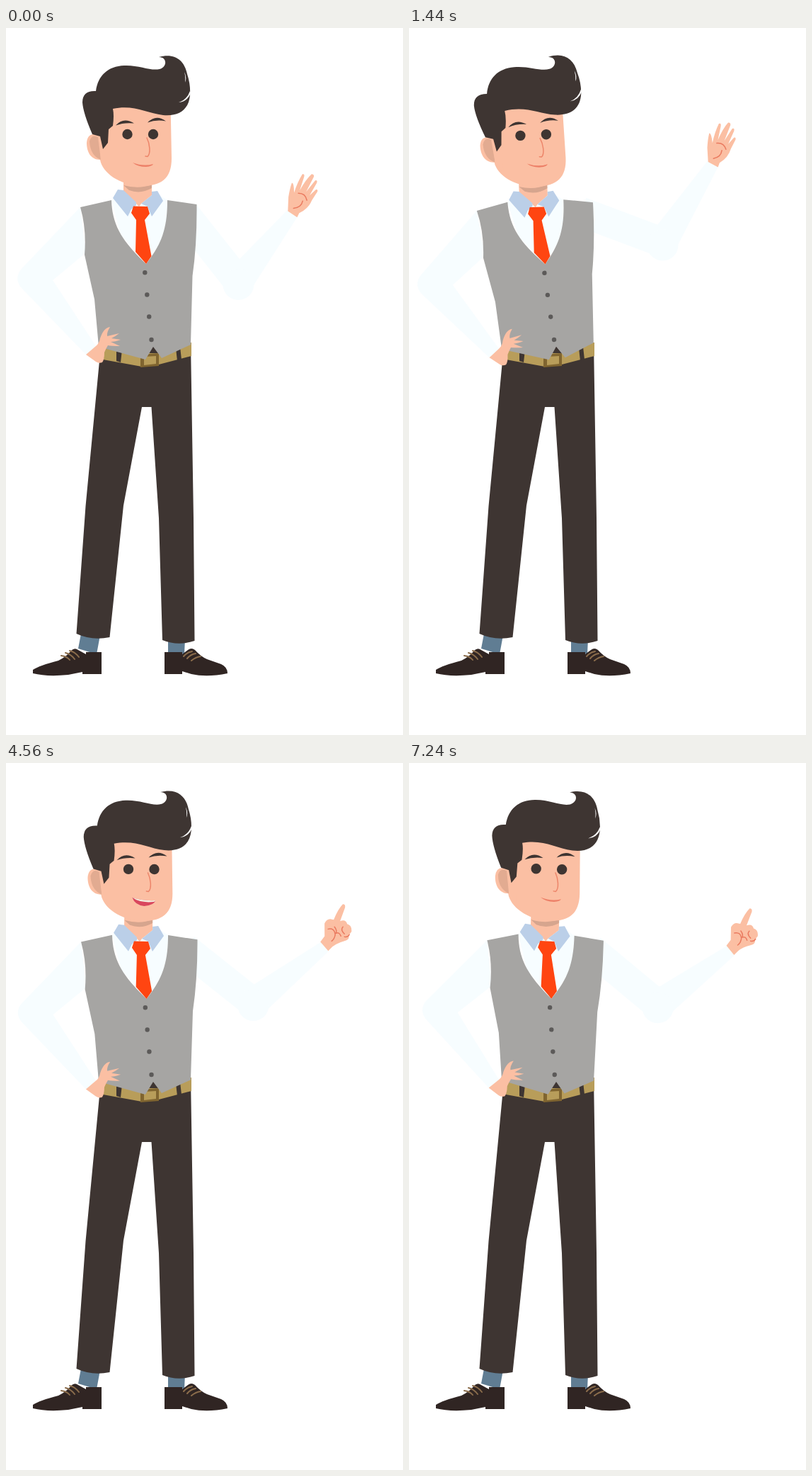
Write an HTML page that moves like this. It is 561x998 px and loops after 7.72 s.

```html
<!DOCTYPE html>
<html lang="en">
<head>
<meta charset="utf-8">
<title>Presenter</title>
<style>
html, body { margin: 0; width: 100%; height: 100%; overflow: hidden; background: #fff; }
svg { display: block; width: 100%; height: 100%; }
.dark { fill: #3e3532; }
.skin { fill: #fbbfa3; }
.sleeve { fill: #f7fdff; }
.vest { fill: #a6a5a3; }
.collar { fill: #bbcfe8; }
.tie { fill: #ff4511; }
.gold { fill: #b89d5a; }
.shoe { fill: #302523; }
.sock { fill: #607d93; }
.lip { fill: #d9475e; }
.teeth { fill: #f4efe0; }
.lace { fill: none; stroke: #8a6c4b; stroke-width: 2; stroke-linecap: round; }
.crease { fill: none; stroke: #ea7a5f; stroke-width: 1.5; stroke-linecap: round; }
</style>
</head>
<body>
<svg viewBox="0 0 561 998">
  <!-- legs -->
  <path class="sock" d="M106 855L133 857L128 884L102 876ZM229 862H253L252 884L229 881Z"/>
  <path class="dark" d="M133 452L261 444L265 692L266.500 865Q243 873 221 864L216 692L205.500 535H192L166 674L146.500 860Q121 865 99.500 855L112.500 675L132 470Z"/>
  <path class="shoe" d="M38 910V906Q47 900 74 893Q86 887 92 879Q97 874 102 878L113 884V881H135V912H108V909L88 913Q58 916 38 911Z"/>
  <path class="shoe" d="M224 881H249V884L257 878Q262 874 267 878Q275 887 284 891L304 898Q313 902 313 911Q284 917 262 912L249 908V912H224Z"/>
  <path class="lace" d="M78 886Q86 887 90 892M84 882Q92 884 97 891M90 879Q98 881 103 888M251 887Q256 881 263 880M256 890Q261 884 268 883M262 893Q268 888 275 887"/>
  <!-- belt -->
  <path class="gold" d="M138 448L262 444V463L216 475L192 478L137 468Z"/>
  <path class="dark" d="M195 440H222L216 459H199ZM156 452L164 454L162 472L156 470ZM240 452L246 450L248 468L242 470Z"/>
  <path fill="#806530" d="M190 461L216 459V477L190 479Z"/>
  <path class="gold" d="M195 464L212 463V474L195 476Z"/>
  <!-- everything above the waist -->
  <g id="torso">
    <g class="sleeve">
      <path d="M105 253L21 341Q11 354 22 367L114 462L127 449L66 356L113 317Z"/>
      <path id="upper"/><path id="fore"/><circle id="elbow" r="22"/>
    </g>
    <g id="palm">
      <path class="skin" d="M-6 -4L-5 -24Q-3 -36 0 -44Q3 -44 3 -30Q8 -45 15 -56Q19 -57 17 -51L11 -33Q20 -49 28 -56Q32 -56 31 -52L20 -31L33 -47Q37 -48 35 -43L25 -26L34 -34Q37 -35 36 -31L28 -19Q23 -7 10 -1L7 5Z"/>
      <path class="crease" d="M2 -8Q13 -9 15 -18M9 -29Q19 -29 21 -19"/>
    </g>
    <g id="point">
      <path class="skin" d="M-6 -7L0 -15V-33Q3 -39 8 -39L13 -38Q19 -53 26 -60Q30 -60 29 -55L22 -36Q30 -39 32 -32Q39 -30 38 -21L34 -16Q36 -10 28 -8Q17 -5 11 0L5 6Z"/>
      <path class="crease" d="M5 -25Q14 -27 15 -17Q14 -11 10 -8M14 -28Q18 -23 16 -19Q21 -21 23 -15M26 -28Q22 -24 28 -18M28 -14Q33 -13 35 -17"/>
    </g>
    <path class="sleeve" d="M149 243L166 229H206L228 243L226 290L198 333L162 292Z"/>
    <path class="skin" d="M166 210H206V236L191 248L188 252L184 248L166 230Z"/>
    <path fill="#d6a58e" d="M166 222Q188 228 206 221V226Q190 235 174 229Z"/>
    <path class="vest" d="M105 253L149 243C150 282 168 304 198 333C219 306 228 285 228 243L269.500 249Q270 305 263.500 350L261 447L220 466L208 450L197 468L131 450L125 383L111 320Q114 284 105 253Z"/>
    <path class="collar" d="M151 240L158 228L166 229L184 246V250L177 256L172 266ZM191 248L206 236V231L214 230L222 244L206 266L200 252Z"/>
    <path class="tie" d="M180 251.500L200 252L203 262L196 271L205.500 322L198 333L183 316L184 271L177 261Z"/>
    <g fill="#5c5a59"><circle cx="196.300" cy="345.300" r="3.200"/><circle cx="199.300" cy="376.500" r="3.200"/><circle cx="202.200" cy="407.500" r="3.200"/><circle cx="205.500" cy="440" r="3.200"/></g>
    <path class="skin" d="M113 461L127 449Q132 445 133 438Q138 423 147 422Q142 430 143 435L160 431Q155 435 149 438L162 440Q154 443 148 443L161 449Q149 449 144 448Q141 453 139 458Q139 468 136 472Q131 474 127 471Z"/>
    <!-- head -->
    <path class="skin" d="M140 105H232.500L234 184C234 212 220 223 192 223C160 222 136 204 133 186C120 186 114 175 114 162Q115 150 124 150L140 152Z"/>
    <path fill="#e2ab91" d="M118 160Q121 149 130 154L134 186Q119 180 118 160Z"/>
    <path class="skin" d="M133 165H145V200L134 190Z"/>
    <path class="dark" d="M122 150Q109 120 108 105Q108 88 127 89C130 67 144 54 167 53C188 52 204 61 217 58C228 55 228 41 216 41C238 35 252 45 256 65Q261 80 260 95C258 116 244 125 222 123C198 120 181 108 151 114Q153 123 151 138L145 143L144 162L137 171L133 153Z"/>
    <path fill="#fff" d="M244 105Q256 101 260 89L261 92Q256 104 244 105ZM252 62Q256 70 253 77Q254 69 252 62Z"/>
    <circle class="dark" cx="171.500" cy="150" r="7.200"/>
    <circle class="dark" cx="208" cy="150" r="7.200"/>
    <path class="dark" d="M155 137.500Q166 125 181 134.500Q167 133 155 137.500ZM200 133.500Q212 121 226 131.500Q212 129 200 133.500Z"/>
    <path class="crease" d="M199 155C203 163 205 177 200 181.500L197 181" stroke-opacity=".85"/>
    <g id="mouths">
      <path fill="#ed8068" d="M179 190Q194 196 208 192Q207 195 198 196Q186 196 179 190Z"/>
      <g>
        <path class="lip" d="M177 190Q192 195 210 194Q208 201 194 202Q181 201 177 190Z"/>
        <path class="teeth" d="M177 190Q192 195 210 194Q209 196 207 196Q188 198 177 190Z"/>
      </g>
      <g>
        <path class="lip" d="M196 195L210 193Q208 202 198 203Z"/>
        <path class="teeth" d="M178 190Q190 195 206 195Q203 199 202 203Q182 204 178 190Z"/>
      </g>
    </g>
  </g>
</svg>
<script>
const LOOP = 7720, FRAME = 40;
const $ = id => document.getElementById(id);
const mouths = [...$('mouths').children];

// time, body lean, upper arm angle, forearm angle, forearm length
const poses = [
  [0, 0, 51.6, -51.5, 122],
  [480, -2.7, 23.2, -75, 131],
  [1140, -2.7, 23.2, -50.5, 131],
  [1510, -2.7, 23.2, -55, 131],
  [1910, .55, 40, -39, 131],
  [2800, .55, 38.1, -38.25, 128],
  [4440, .55, 38.1, -38.25, 128],
  [5040, -1.96, 38.1, -38.25, 128],
  [5840, -1.96, 38.1, -38.25, 128],
  [6320, 1.55, 38.1, -38.25, 128],
  [LOOP, 1.55, 38.1, -38.25, 128]
];
const SHOULDER = [252, 261.5], UPPER = 123;
const TALK = [0, 1, 2, 0, 1, 2, 1];

function poseAt(t) {
  const i = poses.findIndex(p => p[0] > t);
  const a = poses[i - 1], b = poses[i];
  const x = (t - a[0]) / (b[0] - a[0]), e = x * x * (3 - 2 * x);
  return a.map((v, k) => v + (b[k] - v) * e).slice(1);
}

function polar([x, y], deg, r) {
  const a = deg * Math.PI / 180;
  return [x + r * Math.cos(a), y + r * Math.sin(a)];
}

function limb(id, a, b, deg, wa, wb) {
  const pts = [polar(a, deg - 90, wa), polar(b, deg - 90, wb), polar(b, deg + 90, wb), polar(a, deg + 90, wa)];
  $(id).setAttribute('d', 'M' + pts.join('L') + 'Z');
}

function mouthAt(t) {
  if (t >= 1640 && t < 4960) return TALK[Math.floor(t / 80) % 7];
  if (t >= 6280 && t < 7240) return TALK[(Math.floor((t - 6280) / 80) + 1) % 7];
  return 0;
}

function hand(id, on, [x, y], turn) {
  $(id).setAttribute('display', on ? 'inline' : 'none');
  $(id).setAttribute('transform', `translate(${x} ${y}) rotate(${turn})`);
}

function draw(t) {
  const [lean, up, fore, len] = poseAt(t);
  const elbow = polar(SHOULDER, up, UPPER), wrist = polar(elbow, fore, len);
  $('torso').setAttribute('transform', `rotate(${lean} 205 450)`);
  limb('upper', SHOULDER, elbow, up, 21, 21);
  limb('fore', elbow, wrist, fore, 21, 8.5);
  $('elbow').setAttribute('cx', elbow[0]);
  $('elbow').setAttribute('cy', elbow[1] + 4);
  const pointing = t >= 2520;
  hand('palm', !pointing, wrist, fore + 51);
  hand('point', pointing, wrist, fore + 37.7);
  const m = mouthAt(t);
  mouths.forEach((el, i) => el.setAttribute('display', i === m ? 'inline' : 'none'));
}

const start = performance.now();
function tick() {
  const t = (performance.now() - start) % LOOP;
  draw(Math.floor(t / FRAME) * FRAME);
  requestAnimationFrame(tick);
}
tick();
</script>
</body>
</html>
```
